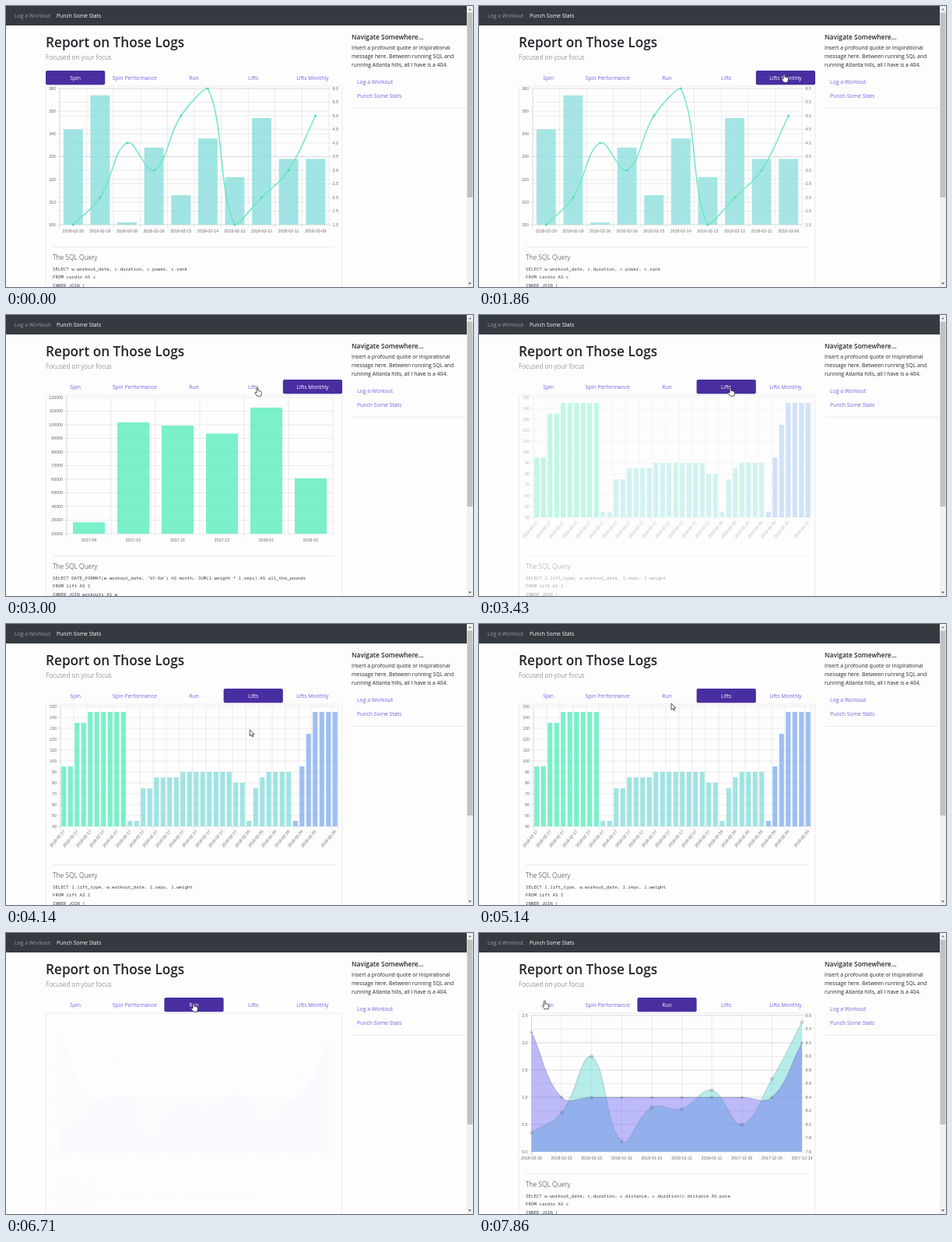
Recreate the animation shown at these times as an HTML page. Size 600 by 361 pixels, loop 8000 ms.

```html
<!DOCTYPE html>
<html lang="en">
<head>
<meta charset="utf-8">
<title>Workout report</title>
<style>
  html, body { margin: 0; width: 100%; height: 100%; overflow: hidden; background: #fdfdfe; }
  svg { display: block; width: 100%; height: 100%; }
  text { font-family: "Open Sans", "Noto Sans", sans-serif; font-size: 6.85px; fill: #212529; white-space: pre; }
  .light { font-weight: 300; font-size: 8.5px; }
  .link { fill: #6a66e0; }
  .axis { font-family: "Liberation Sans", Arial, sans-serif; font-size: 5.3px; fill: #666; }
  .code { font-family: "Noto Sans Mono", "DejaVu Sans Mono", monospace; font-size: 5.77px; fill: #3a3d42; }
  .grid { stroke: #000; stroke-opacity: .11; stroke-width: .7; fill: none; }
  .base { stroke: #000; stroke-opacity: .22; stroke-width: .7; }
</style>
</head>
<body>
<svg id="stage" viewBox="0 0 600 361" preserveAspectRatio="none"></svg>
<script>
const LOOP = 8000, FPS = 7, FADE = 150;
const TOP = 106;
const CYAN = 'rgba(130,220,218,.75)', GREEN = 'rgba(80,236,184,.75)', BLUE = 'rgba(127,171,238,.75)';

const text = (x, y, str, attrs = '') => `<text x="${x}" y="${y}" ${attrs}>${str}</text>`;
const rect = (x, y, w, h, fill, extra = '') =>
  `<rect x="${x}" y="${y}" width="${w}" height="${h}" fill="${fill}" ${extra}/>`;
const line = (x1, y1, x2, y2, cls = 'grid') => `<path class="${cls}" d="M${x1} ${y1}L${x2} ${y2}"/>`;
const range = (n, fn) => Array.from({ length: n }, (_, i) => fn(i));
const repeat = (...pairs) => pairs.flatMap(([value, n]) => Array(n).fill(value));
const clamp = (v, lo, hi) => Math.min(hi, Math.max(lo, v));

// One vertical scale: grid lines plus labels on the left or right side.
function yAxis({ left, right, bottom, min, max, step, digits = 0, side = 'left' }) {
  const n = Math.round((max - min) / step);
  return range(n + 1, i => {
    const y = bottom - (bottom - TOP) * i / n;
    const label = (min + i * step).toFixed(digits);
    return side === 'left'
      ? line(left - 4, y, right, y) + text(left - 5, y + 1.9, label, 'class="axis" text-anchor="end"')
      : line(left, y, right + 4, y) + text(right + 4.5, y + 1.9, label, 'class="axis"');
  }).join('');
}

const columnLines = (xs, bottom) =>
  xs.map((x, i) => line(x, TOP, x, bottom + 4, i ? 'grid' : 'base')).join('');

const dates = (labels, xAt) =>
  labels.map((s, i) => text(xAt(i), 290.8, s, 'class="axis" text-anchor="middle"')).join('');

function bars(values, { left, right, bottom, min, max }, color) {
  const slot = (right - left) / values.length;
  return values.map((v, i) => {
    const h = (v - min) / (max - min) * (bottom - TOP);
    return rect(left + slot * (i + .14), bottom - h, slot * .72, h, color(i));
  }).join('');
}

// Cardinal-like spline whose control points stay inside the plot.
function spline(points, bottom, tension = .4) {
  const controls = points.map((p, i) => {
    const a = points[i - 1] || p, b = points[i + 1] || p;
    const before = Math.hypot(p[0] - a[0], p[1] - a[1]);
    const after = Math.hypot(b[0] - p[0], b[1] - p[1]);
    const at = k => [p[0] + k * (b[0] - a[0]), clamp(p[1] + k * (b[1] - a[1]), TOP, bottom)];
    const unit = tension / (before + after);
    return { enter: at(-unit * before), leave: at(unit * after) };
  });
  return 'M' + points[0] + points.slice(1).map((p, i) =>
    `C${controls[i].leave} ${controls[i + 1].enter} ${p}`).join('');
}

function spinChart() {
  const box = { left: 69, right: 415, bottom: 281, min: 300, max: 360 };
  const slot = 34.6, center = i => box.left + slot * (i + .5);
  const rank = [1, 2, 4, 3, 5, 6, 1, 2, 3, 5].map((v, i) => [center(i), 281 - (v - 1) * 35]);
  return yAxis({ ...box, step: 10 })
    + yAxis({ ...box, min: 1, max: 6, step: .5, digits: 1, side: 'right' })
    + columnLines(range(11, i => box.left + slot * i), 281)
    + dates([20, 19, 16, 16, 15, 14, 12, 12, 11, '09'].map(d => '2018-02-' + d), center)
    + bars([342, 357, 301, 334, 313, 338, 321, 347, 329, 329], box, () => CYAN)
    + `<path d="${spline(rank, 281)}" fill="none" stroke="#68e5c4" stroke-width="1.4"/>`
    + rank.map(([x, y]) => `<circle cx="${x}" cy="${y}" r="1.5" fill="#55d6b4"/>`).join('');
}

function monthlyChart() {
  const box = { left: 78, right: 420, bottom: 281, min: 20000, max: 120000 };
  return yAxis({ ...box, step: 10000 })
    + columnLines(range(7, i => box.left + 57 * i), 281)
    + dates(['2017-09', '2017-10', '2017-11', '2017-12', '2018-01', '2018-02'], i => box.left + 57 * (i + .5))
    + bars([28400, 101800, 99400, 93500, 112600, 60700], box, () => GREEN);
}

function liftsChart() {
  const box = { left: 70, right: 427, bottom: 260, min: 40, max: 150 };
  const weights = repeat([95, 2], [135, 2], [145, 6], [45, 2], [75, 2], [85, 4], [90, 8], [80, 2],
    [45, 1], [75, 1], [85, 1], [90, 4], [45, 1], [95, 1], [125, 1], [145, 4]);
  const shown = [...range(20, i => i * 2), 41];
  const labels = shown.map(i => {
    const x = box.left + 8.5 * (i + .5) + 1.6;
    return text(x, 266.5, i < 28 ? '2018-02-17' : '2018-02-20',
      `class="axis" text-anchor="end" transform="rotate(-50 ${x} 266.5)"`);
  }).join('');
  return yAxis({ ...box, step: 10 })
    + columnLines([...shown.map(i => box.left + 8.5 * i), box.right], 260)
    + labels
    + bars(weights, box, i => i < 10 ? GREEN : i < 35 ? CYAN : BLUE);
}

function runChart() {
  const box = { left: 67.5, right: 415, bottom: 281 };
  const xAt = i => box.left + (box.right - box.left) / 9 * i;
  const place = values => values.map((v, i) => [xAt(i), 281 - v * 70]);
  const pace = place([.35, .714, 1.75, .186, .814, .786, 1.13, .5, 1.336, 2.38]);
  const miles = place([2.2, ...Array(8).fill(1), 2]);
  const area = (points, fill) => {
    const d = spline(points, 281);
    return `<path d="${d}L415 281L67.5 281Z" fill="${fill}"/>`
      + `<path d="${d}" fill="none" stroke="rgba(0,0,0,.13)" stroke-width="1.3"/>`;
  };
  const mark = 'fill="rgba(0,0,0,.1)" stroke="rgba(0,0,0,.18)" stroke-width=".6"';
  return yAxis({ ...box, min: 0, max: 2.5, step: .5, digits: 1 })
    + yAxis({ ...box, min: 7.6, max: 9.6, step: .2, digits: 1, side: 'right' })
    + columnLines(range(10, xAt), 281)
    + dates(['2018-02-20', '2018-02-15', '2018-02-15', '2018-01-31', '2018-01-31',
      '2018-01-11', '2018-01-11', '2017-12-15', '2017-12-15', '2017-12-14'], xAt)
    + area(pace, 'rgba(135,225,222,.6)')
    + pace.map(([x, y]) => `<circle cx="${x}" cy="${y}" r="2.2" ${mark}/>`).join('')
    + area(miles, 'rgba(98,93,238,.42)')
    + miles.map(([x, y]) => `<path d="M${x} ${y - 2.2}l2 3.4h-4z" ${mark}/>`).join('');
}

const tabs = ['Spin', 'Spin Performance', 'Run', 'Lifts', 'Lifts Monthly'];
const views = [
  { tab: 0, click: -1000, draw: spinChart,
    sql: ['SELECT w.workout_date, c.duration, c.power, c.rank', 'FROM cardio AS c', 'INNER JOIN ('] },
  { tab: 4, click: 1850, draw: monthlyChart,
    sql: ["SELECT DATE_FORMAT(w.workout_date, '%Y-%m') AS month, SUM(l.weight * l.reps) AS all_the_pounds",
      'FROM lift AS l', 'INNER JOIN workouts AS w'] },
  { tab: 3, click: 3210, draw: liftsChart,
    sql: ['SELECT l.lift_type, w.workout_date, l.reps, l.weight', 'FROM lift AS l', 'INNER JOIN ('] },
  { tab: 2, click: 6560, draw: runChart,
    sql: ['SELECT w.workout_date, c.duration, c.distance, c.duration/c.distance AS pace',
      'FROM cardio AS c', 'INNER JOIN ('] },
];

// Pointer stops: step, x, y
const pointerPath = [
  [3, 340, 312], [6, 380, 150], [8, 392, 87], [14, 392, 87], [15, 391, 108], [17, 375, 130],
  [20, 323, 93], [26, 323, 93], [30, 310, 150], [33, 280, 140], [36, 247, 102], [38, 247, 102],
  [42, 241, 90], [50, 241, 90], [55, 84.5, 86.5],
];

const tabX = i => 51 + 76.2 * i;
const page = rect(0, 0, 600, 361, '#fdfdfe')
  + rect(0, 0, 592, 25, '#343a40')
  + text(11, 15.3, 'Log a Workout', 'style="fill:#9a9da0"')
  + text(65, 15.3, 'Punch Some Stats', 'style="fill:#fff"')
  + rect(592, 0, 8, 361, '#f1f1f1')
  + rect(592.5, 8.5, 7, 237.5, '#c1c1c1')
  + '<path d="M594 5.2l2-2.2 2 2.2z" fill="#777"/><path d="M594 355.5l2 2.2 2-2.2z" fill="#505050"/>'
  + text(51, 52.8, 'Report on Those Logs', 'style="font-size:17.2px;font-weight:600"')
  + text(51, 69.4, 'Focused on your focus', 'class="light" style="font-size:8.35px;fill:#5c646b"')
  + text(444, 43, 'Navigate Somewhere...', 'style="font-size:8.4px;font-weight:600"')
  + ['Insert a profound quote or inspirational', 'message here. Between running SQL and',
    'running Atlanta hills, all I have is a 404.'].map((s, i) => text(444, 56.3 + 10.75 * i, s)).join('')
  + text(451, 99.7, 'Log a Workout', 'class="link"')
  + text(451, 117.6, 'Punch Some Stats', 'class="link"')
  + line(444, 131.3, 592, 131.3)
  + '<rect x="51.2" y="103" width="380.6" height="300" rx="1.5" class="grid"/>';

const stage = document.getElementById('stage');
stage.innerHTML = page
  + rect(51, 83, 76.2, 18.2, '#482ea0', 'id="pill" rx="2"')
  + tabs.map((s, i) => text(tabX(i + .5), 95, s, 'class="link tab" text-anchor="middle"')).join('')
  + views.map(v => `<g class="view">${v.draw()}${line(60, 309.5, 423, 309.5)}`
    + text(60, 326, 'The SQL Query', 'class="light"')
    + v.sql.map((s, i) => text(60, 339.8 + 10.5 * i, s, 'class="code"')).join('') + '</g>').join('')
  + `<g id="pointer" stroke="#111" stroke-width=".7" stroke-linejoin="round" fill="#fff">
      <path id="arrow" d="M0 0V8.2L1.9 6.5 3.2 9.4 4.5 8.8 3.2 6H5.8Z"/>
      <path id="hand" d="M-.9 .9Q0-.7 .9 .9V4.2L3.7 4.7Q5.6 5.1 5.4 7.2L4.6 11.2H-.4L-3.3 7Q-3.2 5.4-.9 6.8Z"/>
    </g>`;

const [pill, pointer, arrow, hand] = ['pill', 'pointer', 'arrow', 'hand'].map(id => document.getElementById(id));
const tabNodes = [...stage.querySelectorAll('.tab')];
const viewNodes = [...stage.querySelectorAll('.view')];

function pointerAt(step) {
  const next = pointerPath.findIndex(p => p[0] >= step);
  if (next <= 0) return pointerPath[0].slice(1);
  const [s0, x0, y0] = pointerPath[next - 1], [s1, x1, y1] = pointerPath[next];
  const k = (step - s0) / (s1 - s0);
  return [x0 + (x1 - x0) * k, y0 + (y1 - y0) * k];
}

function render(ms) {
  const step = Math.min(LOOP / 1000 * FPS - 1, Math.floor((ms + 4) * FPS / 1000));
  const now = step * 1000 / FPS;

  const current = views.filter(v => v.click <= now).pop();
  pill.setAttribute('x', tabX(current.tab));
  tabNodes.forEach((node, i) => node.style.fill = i === current.tab ? '#fff' : '');

  viewNodes.forEach((node, i) => {
    const fadeIn = clamp((now - views[i].click - FADE) / FADE, 0, 1);
    const fadeOut = i + 1 < views.length ? clamp((now - views[i + 1].click) / FADE, 0, 1) : 0;
    const opacity = Math.min(fadeIn, 1 - fadeOut);
    node.setAttribute('opacity', opacity);
    node.style.display = opacity ? '' : 'none';
  });

  const [x, y] = pointerAt(step);
  const overTab = y > 83 && y < 101;
  pointer.style.display = step < pointerPath[0][0] ? 'none' : '';
  pointer.setAttribute('transform', `translate(${x} ${y})`);
  arrow.style.display = overTab ? 'none' : '';
  hand.style.display = overTab ? '' : 'none';
}

const start = performance.now();
function tick() {
  render((performance.now() - start) % LOOP);
  requestAnimationFrame(tick);
}
tick();
</script>
</body>
</html>
```
